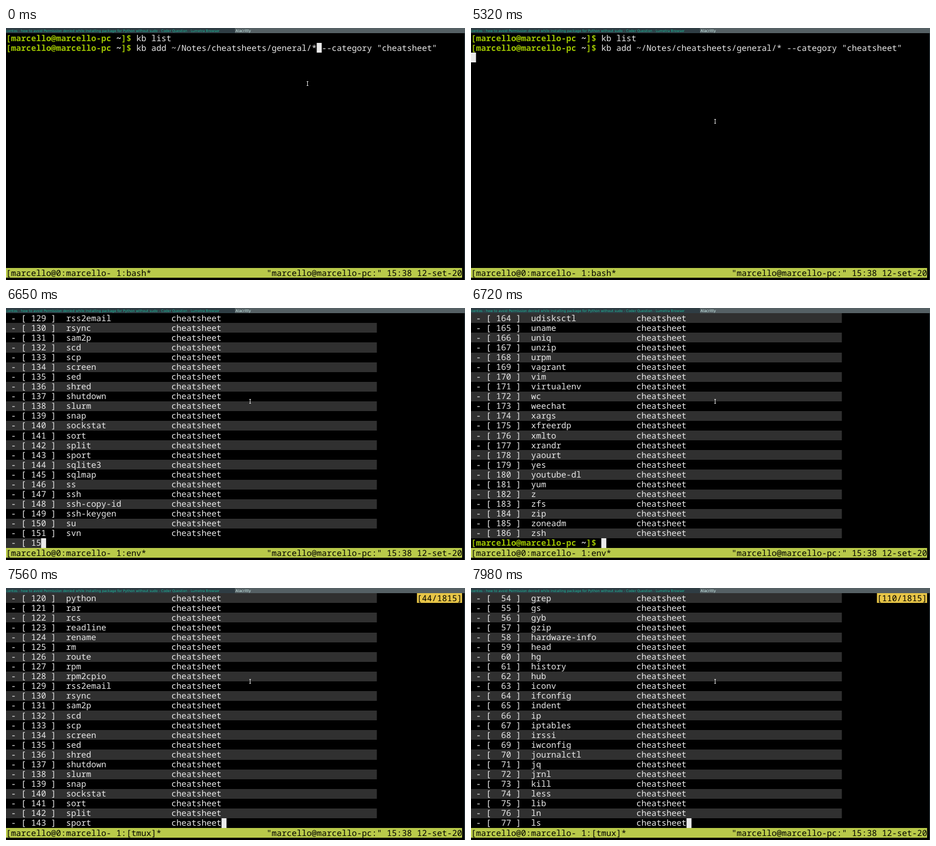
Animation, 800 px wide and 440 px high, one loop 8000 ms. Source, as an HTML page with a canvas:

```html
<!DOCTYPE html>
<html lang="en">
<head>
<meta charset="utf-8">
<title>Terminal list</title>
<style>
html, body { margin: 0; width: 100%; height: 100%; overflow: hidden; background: #000; }
canvas { display: block; }
</style>
</head>
<body>
<canvas id="stage" width="800" height="440"></canvas>
<script>
const ctx = document.getElementById('stage').getContext('2d');
ctx.textRendering = 'geometricPrecision';

const LOOP = 8000, STEP = 70;
const CELL_W = 8.735, CELL_H = 17.08, TOP = 9.2;
const COLS = 91, ROWS = 24, STRIPE_COLS = 74;
const FG = '#eaeaea', GREEN = '#b9ca4a', LIME = '#9ec400', YELLOW = '#e7c547', STRIPE = '#303030';
const USER = 'marcello', HOST = USER + '-pc', PROMPT_LEN = 26;
const ADD = 'kb add ~/Notes/cheatsheets/general/* --category "cheatsheet"';
const LIST = 'kb list';

const FIRST_ID = 54, LAST_ID = 186;
const titles = `grep gs gyb gzip hardware-info head hg history hub iconv ifconfig indent ip
iptables irssi iwconfig journalctl jq jrnl kill less lib ln ls
lsblk lsof lvm man markdown mdadm mkdir mount mysql mysqldump nc ncat netstat nkf nmap
nmcli notify-send nova npm ntp numfmt od openssl org-mode p4 pacman paste patch pdftk
perl pgrep php ping ping6 pip pkgtools pkill popd ps psql pushd pwd
python rar rcs readline rename rm route rpm rpm2cpio rss2email rsync sam2p scd scp
screen sed shred shutdown slurm snap sockstat sort split sport sqlite3 sqlmap ss ssh
ssh-copy-id ssh-keygen su svn symlink sysctl systemctl systemd tail tar tcpdump tee
tmux top tr truncate udisksctl uname uniq unzip urpm vagrant vim virtualenv wc weechat
xargs xfreerdp xmlto xrandr yaourt yes youtube-dl yum z zfs zip zoneadm zsh`.split(/\s+/);

function rect(color, x, y, w, h) {
  ctx.fillStyle = color;
  ctx.fillRect(x, y, w, h);
}

function cells(color, col, row, count) {
  const y = Math.round(TOP + row * CELL_H);
  rect(color, col * CELL_W, y, count * CELL_W, Math.round(TOP + (row + 1) * CELL_H) - y);
}

// Places every character on the terminal grid.
function write(text, col, row, color = FG, bold = false) {
  ctx.font = `${bold ? 'bold ' : ''}14.56px "Noto Sans Mono", monospace`;
  ctx.fillStyle = color;
  [...text].forEach((char, i) => {
    if (char !== ' ') ctx.fillText(char, (col + i) * CELL_W, TOP + row * CELL_H + 13.4);
  });
}

const cursor = (col, row) => cells(FG, col, row, 1);

function prompt(row, command = '') {
  const who = `[${USER}@${HOST}`;
  write(who, 0, row, LIME, true);
  write('~', who.length + 1, row, '#fff', true);
  write(']$', who.length + 2, row, LIME, true);
  write(command, PROMPT_LEN, row);
}

function item(id, row, length = Infinity) {
  if (id % 2 === 0) cells(STRIPE, 0, row, Math.min(length, STRIPE_COLS));
  const text = ` - [ ${String(id).padStart(3)} ]  ${titles[id - FIRST_ID].padEnd(21)}cheatsheet`;
  write(text.slice(0, length), 0, row);
}

function items(firstId, count) {
  for (let row = 0; row < count; row++) item(firstId + row, row);
}

function shell(t) {
  prompt(0, LIST);
  prompt(1, ADD);
  if (t < 560) cursor(PROMPT_LEN + 36, 1);
  else if (t < 5390) cursor(0, 2);
  else {
    const typed = LIST.slice(0, Math.max(0, Math.floor((t - 5440) / 90)));
    prompt(2, typed);
    if (t < 6160) cursor(PROMPT_LEN + typed.length, 2);
    else cursor(0, 3);
  }
}

function printing(lastId) {
  items(lastId - 23, 23);
  item(lastId, 23, 7);
  cursor(7, 23);
}

function scrolled(offset) {
  const bottomId = LAST_ID + 1 - offset;
  if (offset) {
    items(bottomId - 23, ROWS);
    cursor(43, 23);
  } else listed();
}

function listed() {
  items(LAST_ID - 22, 23);
  prompt(23);
  cursor(PROMPT_LEN, 23);
}

function statusBar(t) {
  const name = t < 6300 ? 'bash' : t < 7000 ? 'env' : t < 7210 ? 'bash' : '[tmux]';
  const right = `"${USER}@${HOST}:" 15:38 12-set-20`;
  cells(GREEN, 0, ROWS, COLS);
  write(`[${USER}@0:${USER}- 1:${name}*`, 0, ROWS, '#000');
  write(right, COLS - right.length, ROWS, '#000');
}

function titleBar() {
  rect('#2f3d44', 0, 0, 399, 9);
  rect('#556064', 399, 0, 401, 9);
  rect('#2f3d44', 799, 9, 1, 431);
  ctx.font = '5.9px "DejaVu Sans", sans-serif';
  ctx.fillStyle = '#1abc9c';
  ctx.fillText('centos - how to avoid Permission denied while installing package for Python without sudo - Coder Question - Lumetra Browser', 0.5, 6.6);
  ctx.font = '6.4px "DejaVu Sans", sans-serif';
  ctx.fillStyle = '#d0f4f2';
  ctx.fillText('Alacritty', 400, 6.8);
}

function pointer(t) {
  const p = Math.min(1, t / 280), ease = p * p * (3 - 2 * p);
  const x = Math.round(525 - 100 * ease), y = Math.round(97 + 66 * ease);
  rect('#ddd', x, y - 3, 1, 7);
  rect('#ddd', x - 1, y - 4, 3, 1);
  rect('#ddd', x - 1, y + 3, 3, 1);
}

function draw(time) {
  const t = Math.floor(time / STEP) * STEP;
  rect('#000', 0, 0, 800, 440);
  if (t < 6580) shell(t);
  else if (t < 6720) printing(t < 6650 ? 78 : 152);
  else if (t < 7140) listed();
  else {
    // One page up every 140 ms.
    const offset = 22 * Math.max(0, Math.floor((t - 7280) / 140));
    const label = `[${offset}/1815]`;
    scrolled(offset);
    cells(YELLOW, COLS - label.length, 0, label.length);
    write(label, COLS - label.length, 0, '#000');
  }
  statusBar(t);
  titleBar();
  pointer(t);
}

const start = performance.now();
function tick() {
  draw((performance.now() - start) % LOOP);
  requestAnimationFrame(tick);
}
tick();
</script>
</body>
</html>
```
